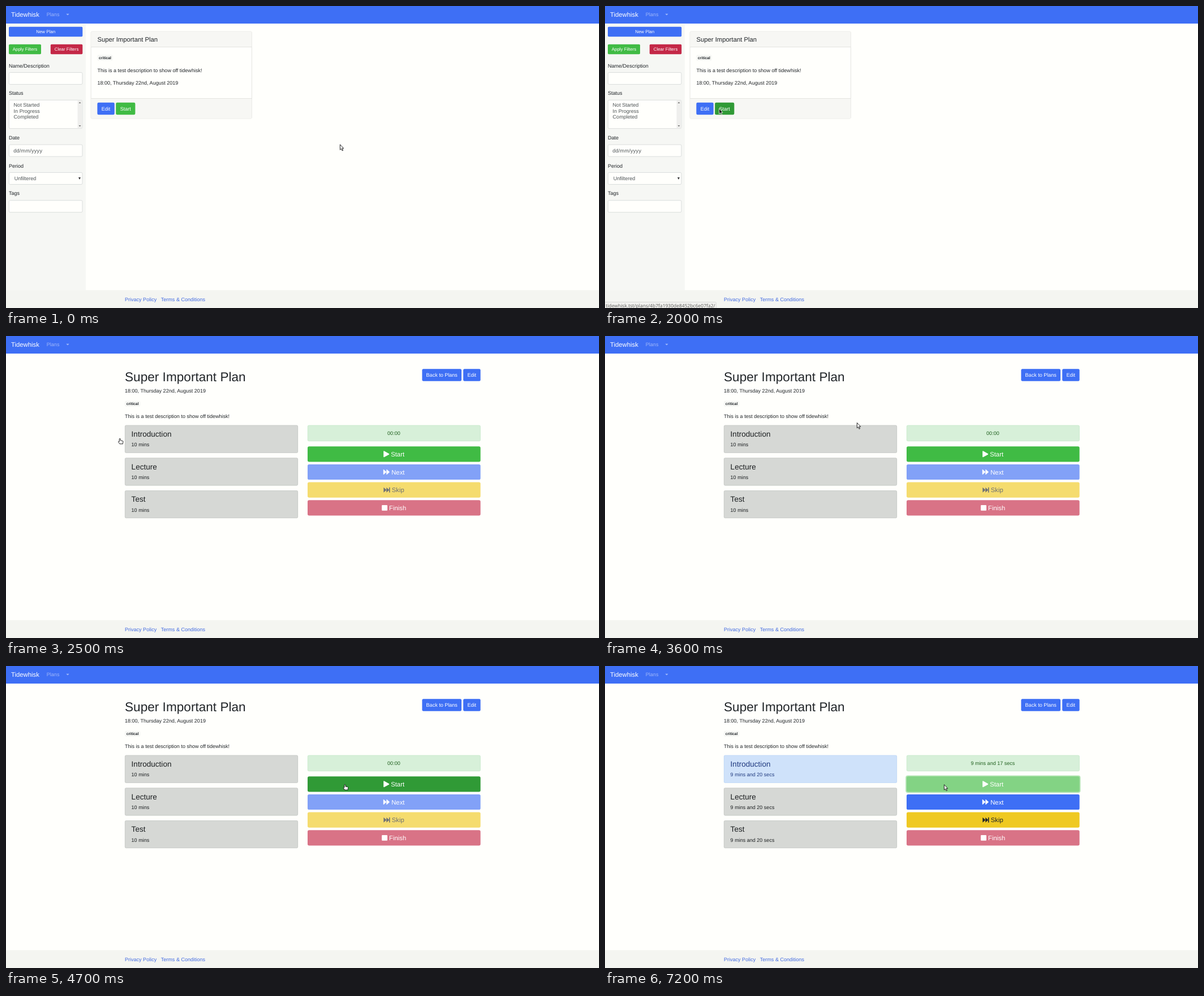
An HTML page with a canvas that plays this animation: 1048x534 px, repeating every 8 s.

```html
<!DOCTYPE html>
<html lang="en">
<head>
<meta charset="utf-8">
<title>Plan timer</title>
<style>
html, body { margin: 0; width: 100%; height: 100%; overflow: hidden; background: #fffffc; }
canvas { display: block; width: 1048px; height: 534px; }
</style>
</head>
<body>
<canvas id="stage" width="1048" height="534"></canvas>
<script>
const ctx = document.getElementById('stage').getContext('2d');
const LOOP = 8000, STEP = 100;
const S = 1048 / 1853; // page pixels to stage pixels
const PAGE = [255, 255, 252], WHITE = [255, 255, 255], INK = [33, 37, 41];
const BLUE = [62, 111, 245], GREEN = [64, 187, 68], DARK_GREEN = [48, 154, 54];
const RED = [196, 40, 71], YELLOW = [239, 201, 34];
const FIELD_INK = '#4d5356', BORDER = '#cbcfce', CARD_LINE = '#d8d9d6';
const SANS = '"Liberation Sans", Arial, sans-serif';

const clamp = v => Math.max(0, Math.min(1, v));
const mix = (a, b, k) => a.map((v, i) => v + (b[i] - v) * k);
const css = c => typeof c === 'string' ? c : `rgb(${c.map(Math.round).join()})`;
const dim = c => mix(PAGE, c, 0.65);

// y is the middle of the text line
function text(str, x, y, color = INK, size = 16, o = {}) {
  const px = size * S;
  ctx.font = `${o.bold ? 'bold ' : ''}${px}px ${o.family || SANS}`;
  ctx.textRendering = 'geometricPrecision';
  ctx.letterSpacing = (o.spacing || 0) + 'px';
  ctx.textAlign = o.align || 'left';
  ctx.fillStyle = css(color);
  ctx.fillText(str, x, y + px * 0.3465);
}

function rect(x, y, w, h, color) {
  ctx.fillStyle = css(color);
  ctx.fillRect(x, y, w, h);
}

function box(x, y, w, h, fill, r = 2.3, line) {
  ctx.beginPath();
  ctx.roundRect(x, y, w, h, r);
  ctx.fillStyle = css(fill);
  ctx.fill();
  if (!line) return;
  const d = 0.35;
  ctx.beginPath();
  ctx.roundRect(x + d, y + d, w - 2 * d, h - 2 * d, r - d);
  ctx.lineWidth = 0.7;
  ctx.strokeStyle = css(line);
  ctx.stroke();
}

function poly(color, ...pts) {
  ctx.beginPath();
  pts.forEach(([x, y]) => ctx.lineTo(x, y));
  ctx.closePath();
  ctx.fillStyle = css(color);
  ctx.fill();
}

const down = (x, y, w, h, c) => poly(c, [x - w / 2, y], [x + w / 2, y], [x, y + h]);

function button(label, x, y, w, color, size = 16) {
  const h = size === 14 ? 17.5 : 21.5;
  box(x, y, w, h, color, size === 14 ? 1.8 : 2.3);
  text(label, x + w / 2, y + h / 2, WHITE, size, { align: 'center' });
}

function badge(x, y) {
  box(x, y - 5.1, 27.3, 10.2, '#f6f7f4');
  text('critical', x + 2.7, y, INK, 12, { bold: true });
}

function frame() {
  rect(0, 0, 1048, 534, PAGE);
  rect(0, 0, 1048, 31.1, BLUE);
  text('Tidewhisk', 9, 15.3, WHITE, 20);
  const soft = mix(BLUE, WHITE, 0.5);
  text('Plans', 71.8, 15.3, soft);
  down(109, 13.7, 5.4, 2.7, soft);
  rect(0, 502.5, 1048, 31.5, '#f4f5f1');
  text('Privacy Policy', 210, 519.2, '#4169e0');
  text('Terms & Conditions', 273.8, 519.2, '#4169e0');
}

function sidebar() {
  rect(0, 31.1, 141, 471.4, '#f6f7f4');
  button('New Plan', 5, 36.8, 130.3, BLUE, 14);
  button('Apply Filters', 5, 67.8, 57, GREEN, 14);
  button('Clear Filters', 78.8, 67.8, 56.5, RED, 14);
  const labels = { 'Name/Description': 105.5, Status: 154.3, Date: 232.8, Period: 282.6, Tags: 331.3 };
  for (const name in labels) text(name, 5, labels[name]);
  for (const y of [117.2, 244.8, 294.1, 343.4]) box(5, y, 130.3, 21.7, PAGE, 2.3, BORDER);

  box(5, 166, 130.3, 51, PAGE, 2.3, BORDER);
  ['Not Started', 'In Progress', 'Completed'].forEach((s, i) => text(s, 13.6, 174.6 + i * 10.8, FIELD_INK));
  rect(126.5, 166.7, 8.2, 49.6, '#efefed');
  down(130.5, 172, 4, -2.2, '#70706e');
  down(130.5, 211, 4, 2.2, '#70706e');

  text('dd/mm/yyyy', 13.2, 255.6, FIELD_INK, 16, { spacing: 0.28 });
  text('Unfiltered', 14.7, 304.8, FIELD_INK);
  down(130, 303, 4, 4, '#333');
}

function planCard(hover) {
  box(149.8, 44.8, 285, 154.5, PAGE, 2.3, CARD_LINE);
  rect(150.4, 45.4, 283.8, 27, '#f7f7f4');
  rect(150.4, 163.9, 283.8, 34.8, '#f7f7f4');
  rect(150.4, 72.3, 283.8, 0.7, CARD_LINE);
  rect(150.4, 163.3, 283.8, 0.7, CARD_LINE);
  text('Super Important Plan', 161.4, 59, INK, 20);
  badge(161.4, 91.6);
  text('This is a test description to show off tidewhisk!', 161.4, 113.6);
  text('18:00, Thursday 22nd, August 2019', 161.4, 136.1);
  button('Edit', 161.4, 170.7, 30.4, BLUE);
  button('Start', 194.2, 170.7, 34.2, mix(GREEN, DARK_GREEN, hover));
}

const icons = {
  play(x, y, c) { poly(c, [x, y - 5.3], [x + 1, y - 5.5], [x + 9.9, y - 0.6], [x + 9.9, y + 0.6], [x + 1, y + 5.5], [x, y + 5.3]); },
  next(x, y, c) {
    for (const d of [0, 5.6]) poly(c, [x + d, y - 4.4], [x + d + 0.7, y - 4.6], [x + d + 5.7, y], [x + d + 0.7, y + 4.6], [x + d, y + 4.4]);
  },
  skip(x, y, c) {
    for (const d of [0, 4.9]) poly(c, [x + d, y - 4.5], [x + d + 5.1, y], [x + d, y + 4.5]);
    rect(x + 9.6, y - 4.5, 1.6, 9, c);
  },
  stop(x, y, c) { box(x, y - 5, 9.9, 9.9, c, 1); }
};

function control(label, icon, row, color, ink = WHITE) {
  const y = 195.2 + row * 31.7, mid = y + 13.6;
  const [x, tx] = { play: [667.2, 680.2], next: [666.8, 681.2], skip: [667.4, 681.8], stop: [664.1, 677.1] }[icon];
  box(533, y, 305.6, 27.2, color, 2.7);
  icons[icon](x, mid, css(ink));
  text(label, tx, mid + 0.2, ink, 20);
}

function planPage(t, hover) {
  const running = t >= 6000;
  text('Super Important Plan', 210, 72.1, INK, 40);
  text('18:00, Thursday 22nd, August 2019', 210, 96.6);
  badge(210, 119.8);
  text('This is a test description to show off tidewhisk!', 210, 142);
  button('Back to Plans', 735.4, 58.2, 69.6, BLUE);
  button('Edit', 808.1, 58.2, 30.5, BLUE);

  ['Introduction', 'Lecture', 'Test'].forEach((name, i) => {
    const y = 157.8 + i * 57.7, active = running && i === 0;
    const ink = active ? '#203a7f' : '#1c1f21';
    box(210, y, 306, 48.9, active ? '#cfe2fa' : '#d6d8d5', 2.3, active ? '#bdd6f4' : '#c3c6c3');
    text(name, 221.6, y + 15.4, ink, 24);
    text(running ? '9 mins and 20 secs' : '10 mins', 221.6, y + 34.4, ink);
  });

  box(533, 157.8, 305.6, 28.3, '#d7f0d9', 2.3, '#c6e9c9');
  const secs = 19 - (t >= 6200) - (t >= 7200);
  text(running ? `9 mins and ${secs} secs` : '00:00', 685.4, 172, '#21611f', 16, { align: 'center' });

  if (running) box(531.2, 193.4, 309.2, 30.8, mix(PAGE, GREEN, 0.4), 4);
  const start = mix(GREEN, DARK_GREEN, hover);
  control('Start', 'play', 0, running ? dim(start) : start);
  control('Next', 'next', 1, running ? BLUE : dim(BLUE));
  control('Skip', 'skip', 2, running ? YELLOW : dim(YELLOW), running ? INK : dim(INK));
  control('Finish', 'stop', 3, dim(RED));
}

function statusBar(alpha) {
  if (alpha <= 0) return;
  ctx.globalAlpha = alpha;
  box(-3, 523.2, 199.8, 14, '#f2f2ef', 2, '#d0d1ce');
  text('tidewhisk.tst/plans/4b7fa1930de8452bc6e07fa2/', 1.2, 530.1, '#666664', 15,
    { family: '"Noto Sans", "Open Sans", sans-serif' });
  ctx.globalAlpha = 1;
}

// Parabolic sweeps: start, via point reached at share m, end
const moves = [
  { from: 600, to: 1500, m: 0.55, pts: [[590, 244.5], [300, 168], [201.3, 181]] },
  { from: 3100, to: 4000, m: 5 / 9, pts: [[201.3, 181], [445, 153], [542, 176]] },
  { from: 4000, to: 4500, m: 0.5, pts: [[542, 176], [577, 197], [599, 209.3]] }
];

function pointer(t) {
  const move = moves.filter(v => t >= v.from).pop() || moves[0];
  const u = clamp((t - move.from) / (move.to - move.from)), m = move.m;
  const [a, b, c] = move.pts;
  return [0, 1].map(i =>
    a[i] * (u - m) * (u - 1) / m +
    b[i] * u * (u - 1) / (m * (m - 1)) +
    c[i] * u * (u - m) / (1 - m));
}

const ARROW = new Path2D('M.4 .4V9.8L2.6 7.8L4.1 11.4L5.6 10.8L4.1 7.3H6.8Z');
const HAND = new Path2D('M-1 5.8V1Q-1 .4 0 .4T1 1V3.7L4.6 4.4Q5.8 4.7 5.7 6L5.2 8.2V9.8H-.3L-2.7 6.4Q-2.9 5.3-2 5.2Z');

function cursor(t) {
  const [x, y] = pointer(t);
  const hand = (t >= 2100 && t < 3200) || (t >= 4700 && t < 6000);
  const busy = t >= 1900 && t < 2100;
  const shape = hand ? HAND : ARROW;
  ctx.save();
  ctx.translate(x, y);
  ctx.lineJoin = 'round';
  ctx.lineWidth = 0.9;
  ctx.fillStyle = busy ? '#111' : '#fff';
  ctx.strokeStyle = busy ? '#e8f0e6' : '#111';
  ctx.fill(shape);
  ctx.stroke(shape);
  ctx.restore();
}

function draw(now) {
  const t = Math.floor(now % LOOP / STEP) * STEP;
  frame();
  if (t < 2100) {
    sidebar();
    planCard(clamp((t - 1500) / 200));
  } else {
    planPage(t, t < 6000 ? clamp((t - 4300) / 200) : clamp((6200 - t) / 200));
  }
  statusBar(Math.min(clamp((t - 1800) / 200), clamp((2500 - t) / 300)));
  cursor(t);
}

const begin = performance.now();
function tick() {
  draw(performance.now() - begin);
  requestAnimationFrame(tick);
}
tick();
</script>
</body>
</html>
```
